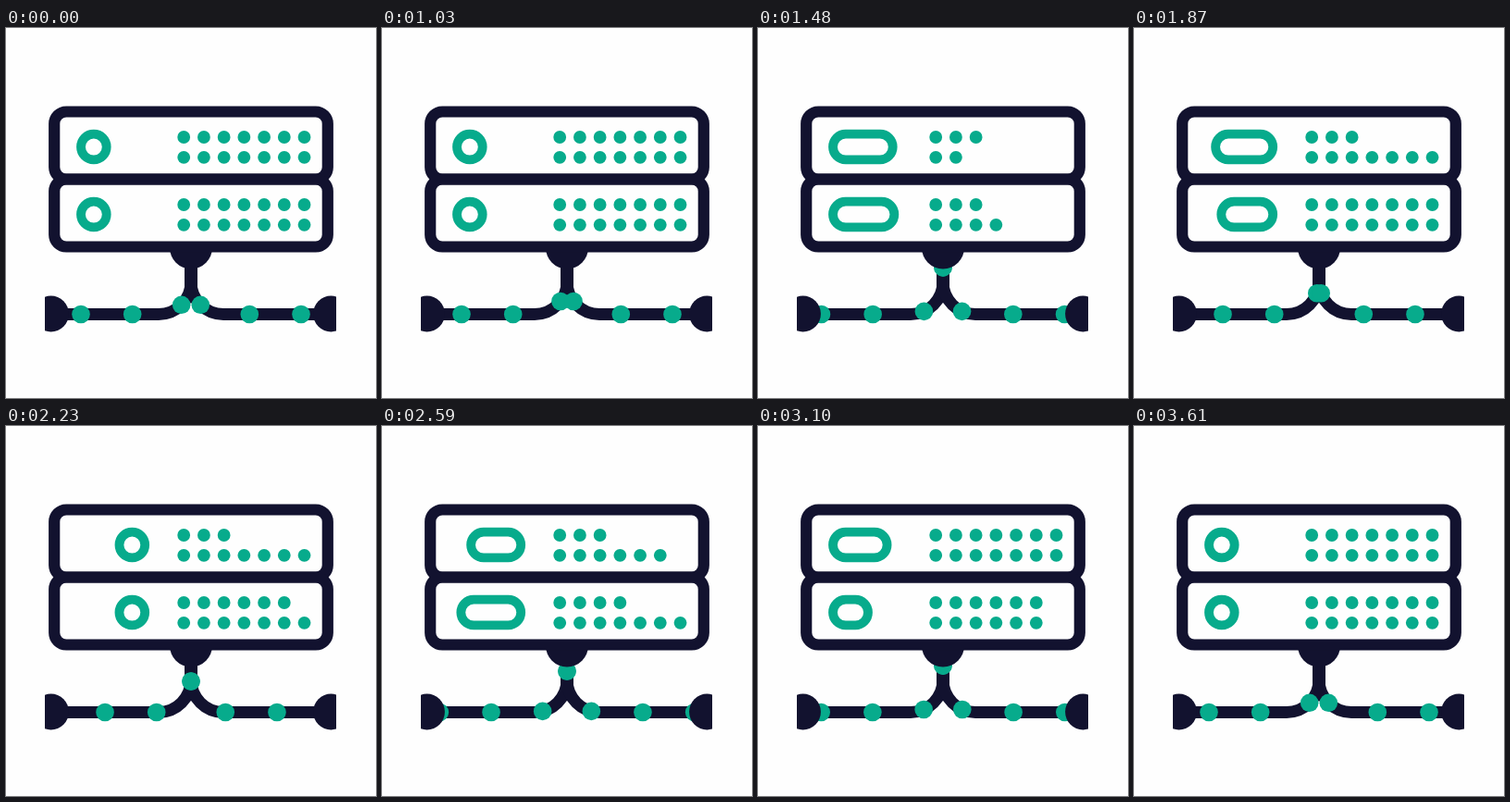
Animation of 400x400 px, one loop 3640 ms. Source, as an HTML page with a canvas:

```html
<!DOCTYPE html>
<html lang="en">
<head>
<meta charset="utf-8">
<title>Server network</title>
<style>
  html, body { margin: 0; width: 100%; height: 100%; overflow: hidden; background: #fefefe; }
  canvas { display: block; width: 100vmin; height: 100vmin; }
</style>
</head>
<body>
<canvas id="stage" width="400" height="400"></canvas>
<script>
const ctx = document.getElementById('stage').getContext('2d');
const NAVY = '#12122f', GREEN = '#07ab8c', WHITE = '#fefefe';
const LOOP = 3640, HOLD = 1000, STEP = 30;

// Cable: straight arm, quarter arc, vertical stem
const ARM = { x: 42, y: 309.5, bend: 165, radius: 35 };
const STRAIGHT = ARM.bend - ARM.x;
const ARC = ARM.radius * Math.PI / 2;
const SPACING = 55.7;

const KEYS = [0, 480, 870, 1590, 2100, 2610];
const FLOW_KEYS = [0, 30, 480, 870, 1590, 2100, 2610];
const FLOW = [0, 0.09, 1.775, 3.27, 5.665, 7.77, 10];

const UNITS = [
  { y: 90.5, pillTime: 600, lights: [[7, 3, 3, 3, 7, 7], [7, 2, 7, 6, 7, 7]] },
  { y: 163.5, pillTime: 566, lights: [[7, 3, 7, 4, 6, 7], [7, 4, 7, 7, 6, 7]] }
];

const clamp = v => Math.min(1, Math.max(0, v));
const ease = p => p < 0.5 ? 4 * p ** 3 : 1 - 4 * (1 - p) ** 3;

function sample(times, values, t) {
  let i = 1;
  while (i < times.length - 1 && t > times[i]) i++;
  const p = clamp((t - times[i - 1]) / (times[i] - times[i - 1]));
  return values[i - 1] + (values[i] - values[i - 1]) * p;
}

function disc(x, y, r, color) {
  ctx.fillStyle = color;
  ctx.beginPath();
  ctx.arc(x, y, r, 0, Math.PI * 2);
  ctx.fill();
}

function strokeBox(x, y, w, h, r, width, color) {
  ctx.beginPath();
  ctx.roundRect(x, y, w, h, r);
  ctx.lineWidth = width;
  ctx.strokeStyle = color;
  ctx.stroke();
}

function cablePoint(s) {
  if (s < STRAIGHT) return [ARM.x + s, ARM.y];
  const cy = ARM.y - ARM.radius;
  if (s < STRAIGHT + ARC) {
    const a = (s - STRAIGHT) / ARM.radius;
    return [ARM.bend + ARM.radius * Math.sin(a), cy + ARM.radius * Math.cos(a)];
  }
  return [ARM.bend + ARM.radius, cy - (s - STRAIGHT - ARC)];
}

function drawNetwork(t) {
  ctx.save();
  ctx.beginPath();
  ctx.rect(42, 0, 315, 400);
  ctx.clip();

  ctx.strokeStyle = NAVY;
  ctx.lineWidth = 13;
  for (const side of [-1, 1]) {
    const mirror = x => 200 + side * (200 - x);
    ctx.beginPath();
    ctx.moveTo(mirror(40), ARM.y);
    ctx.lineTo(mirror(ARM.bend), ARM.y);
    ctx.arcTo(200, ARM.y, 200, 240, ARM.radius);
    ctx.lineTo(200, 240);
    ctx.stroke();
  }
  ctx.fillStyle = NAVY;
  ctx.fillRect(193, 240, 14, 42);

  const first = (39 + sample(FLOW_KEYS, FLOW, t) * SPACING) % SPACING;
  for (let s = first; s < STRAIGHT + ARC + 40; s += SPACING) {
    const [x, y] = cablePoint(s);
    disc(x, y, 9.8, GREEN);
    disc(400 - x, y, 9.8, GREEN);
  }

  disc(48.5, 309, 19.4, NAVY);
  disc(351.5, 309, 19.4, NAVY);
  disc(200, 237.5, 23, NAVY);
  ctx.restore();
}

function drawUnit(unit, t) {
  const phase = (t - 60) / unit.pillTime;
  const part = i => ease(clamp(phase - i));
  const travel = 41.5;
  const left = 81 + travel * (part(1) - part(2));
  const right = 108.7 + travel * (part(0) - part(3));
  strokeBox(left, unit.y + 24.2, right - left, 27.7, 13.85, 9.8, GREEN);

  unit.lights.forEach((counts, row) => {
    const lit = Math.round(sample(KEYS, counts, t));
    for (let i = 0; i < lit; i++) {
      disc(192.2 + i * 21.72, unit.y + 27.5 + row * 21.8, 6.9, GREEN);
    }
  });
}

function draw(time) {
  const t = Math.max(0, Math.floor((time - HOLD) / STEP + 1e-6) * STEP);
  ctx.fillStyle = WHITE;
  ctx.fillRect(0, 0, 400, 400);
  drawNetwork(t);
  ctx.fillStyle = WHITE;
  ctx.fillRect(52, 90.5, 296, 146);
  for (const unit of UNITS) {
    strokeBox(52.2, unit.y, 295.6, 73, 13, 12.2, NAVY);
    drawUnit(unit, t);
  }
}

const start = performance.now();
function tick() {
  draw((performance.now() - start) % LOOP);
  requestAnimationFrame(tick);
}
tick();
</script>
</body>
</html>
```
